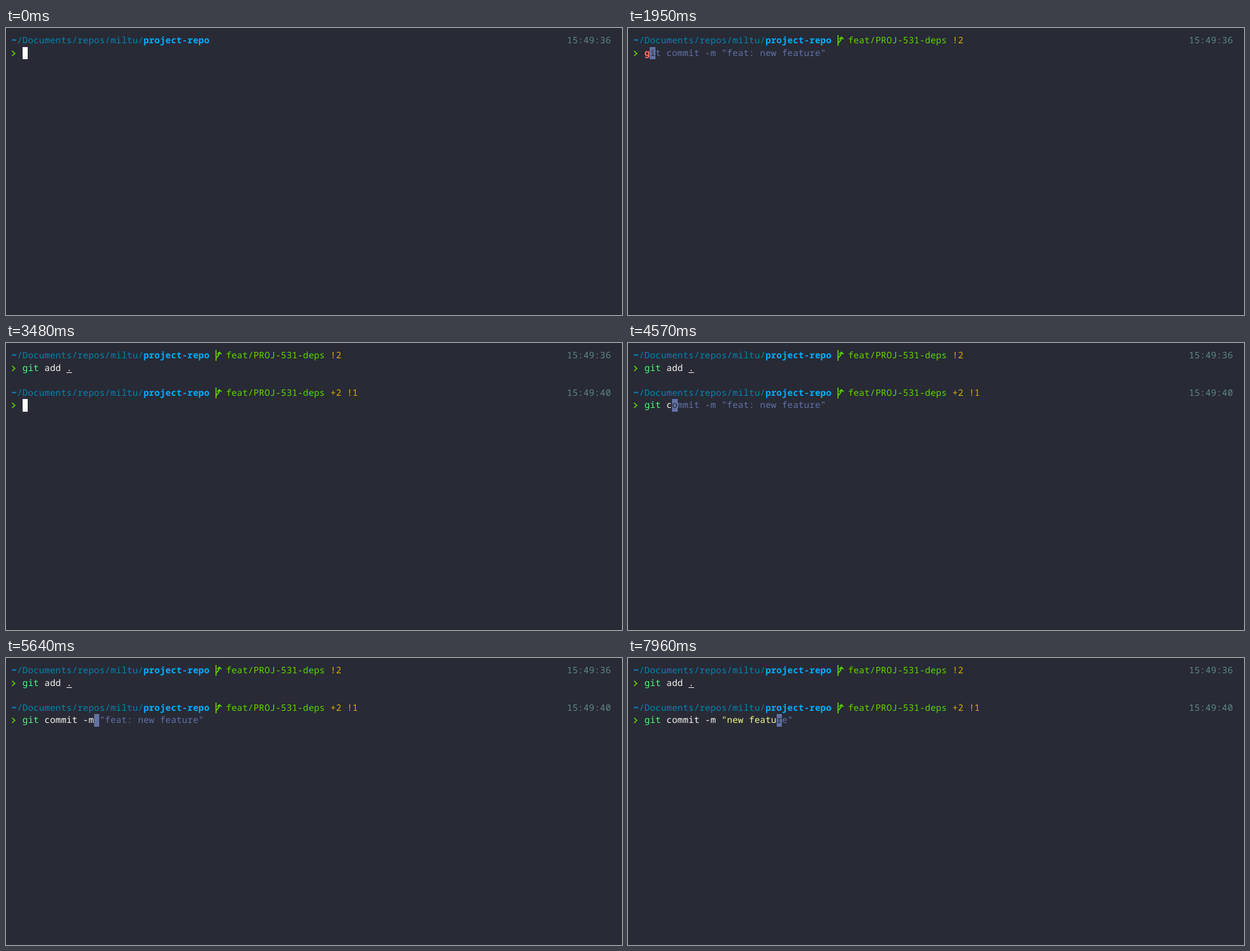
These frames come from a looping animation (965 px wide and 451 px high, 8000 ms). An HTML page:

```html
<!DOCTYPE html>
<html lang="en">
<head>
<meta charset="utf-8">
<title>Terminal session</title>
<style>
  html, body { margin: 0; width: 100%; height: 100%; overflow: hidden; background: #282a36; }
  svg { display: block; width: 965px; height: 451px; }
  text {
    font: 14px "Noto Sans Mono", "DejaVu Sans Mono", monospace;
    letter-spacing: .216px;
    white-space: pre;
    text-rendering: geometricPrecision;
  }
  .bold { font-weight: 700; }
</style>
</head>
<body>
<svg id="stage" viewBox="0 0 965 451">
  <defs>
    <path id="chevron" d="M9.6 36 L13.8 40 L9.6 44" fill="none" stroke="#5fd700" stroke-width="1.7"/>
    <g id="branch" fill="none" stroke="#5fd700" stroke-width="1.6">
      <path d="M329 11 V28 M329 25 C329 21 334.3 21.5 334.3 15"/>
      <path d="M331 17.6 L334.3 14.3 L337.6 17.6"/>
    </g>
  </defs>
</svg>
<script>
const LOOP = 8000;
const CELL = 965 / 112, LINE = 451 / 23;
const C = {
  bg: '#282a36', fg: '#f8f8f2', cursor: '#ffffff', hint: '#6272a4', bad: '#ff6e67', good: '#50fa7b',
  string: '#f1fa8c', path: '#0087af', anchor: '#00afff', branch: '#5fd700', dirty: '#d7af00', clock: '#5f8787'
};
const ADD = 'git add .';
const FEAT = 'git commit -m "feat: new feature"';
const NEW = 'git commit -m "new feature"';

// Each key time reveals one more character of the command.
const firstCmd = {
  row: 1, text: ADD, history: [FEAT, NEW, ADD],
  keys: [1950, 2090, 2200, 2300, 2530, 2740, 2900, 3030, 3170]
};
const secondCmd = {
  row: 4, text: NEW, history: [ADD, FEAT, NEW],
  keys: [4100, 4190, 4280, 4370, 4570, 4640, 4820, 5000, 5120, 5290, 5450, 5600,
    5640, 5870, 6140, 6430, 6510, 6600, 6680, 7340, 7380, 7580, 7870, 7960]
};
const BRANCH_AT = 660, ENTER_AT = 3440, PROMPT_AT = 3480;
const steps = [BRANCH_AT, ENTER_AT, PROMPT_AT, ...firstCmd.keys, ...secondCmd.keys];

const layer = add('g', {}, document.getElementById('stage'));

function add(tag, attrs, parent = layer) {
  const el = document.createElementNS('http://www.w3.org/2000/svg', tag);
  for (const k in attrs) el.setAttribute(k, attrs[k]);
  return parent.appendChild(el);
}

function colX(col) { return (col + 1) * CELL; }
function rowY(row) { return Math.round(LINE * (row + .5) + .1); }
function baseY(row) { return Math.round(LINE * (row + .5) + 14.2); }

function put(col, row, str, fill, bold) {
  if (!str) return;
  const attrs = { x: colX(col), y: baseY(row), fill };
  if (bold) attrs.class = 'bold';
  add('text', attrs).textContent = str;
}

function block(col, row, fill) {
  const x = Math.round(colX(col)), y = rowY(row);
  add('rect', { x, y, width: Math.round(colX(col + 1)) - x, height: rowY(row + 1) - y, fill });
}

function drawPrompt(row, clock, status, showBranch) {
  put(0, row, '~', C.anchor, true);
  put(1, row, '/Documents/repos/miltu/', C.path);
  put(24, row, 'project-repo', C.anchor, true);
  if (showBranch) {
    add('use', { href: '#branch', y: baseY(row) - baseY(0) });
    put(39, row, 'feat/PROJ-531-deps', C.branch);
    put(58, row, status, C.dirty);
  }
  put(101, row, clock, C.clock);
  add('use', { href: '#chevron', y: baseY(row + 1) - baseY(1) });
}

function drawCommand({ row, text, history, keys }, t, active) {
  const typed = text.slice(0, keys.filter(k => k <= t).length);
  const [word] = typed.split(' ');
  const known = word === 'git';
  const quote = typed.indexOf('"');
  const argsEnd = quote < 0 ? typed.length : quote;
  put(2, row, word, known ? C.good : C.bad, !known);
  put(2 + word.length, row, typed.slice(word.length, argsEnd), C.fg);
  put(2 + argsEnd, row, typed.slice(argsEnd), C.string);
  if (typed.endsWith('.')) {
    add('rect', { x: colX(1 + typed.length), y: baseY(row) + 2, width: CELL, height: 1, fill: C.fg });
  }
  if (!active) return;

  const match = typed && history.find(h => h.startsWith(typed));
  const hint = match ? match.slice(typed.length) : '';
  const col = 2 + typed.length;
  block(col, row, hint ? C.hint : C.cursor);
  put(col, row, hint[0], C.bg);
  put(col + 1, row, hint.slice(1), C.hint);
}

function draw(t) {
  layer.replaceChildren();
  drawPrompt(0, '15:49:36', '!2', t >= BRANCH_AT);
  drawCommand(firstCmd, t, t < ENTER_AT);
  if (t >= PROMPT_AT) {
    drawPrompt(3, '15:49:40', '+2 !1', true);
    drawCommand(secondCmd, t, true);
  } else if (t >= ENTER_AT) {
    block(0, 2, C.cursor);
  }
}

const startTime = performance.now();
let shown = -1;
function tick() {
  const t = (performance.now() - startTime) % LOOP;
  const step = steps.filter(s => s <= t).length;
  if (step !== shown) {
    draw(t);
    shown = step;
  }
  requestAnimationFrame(tick);
}
tick();
</script>
</body>
</html>
```
